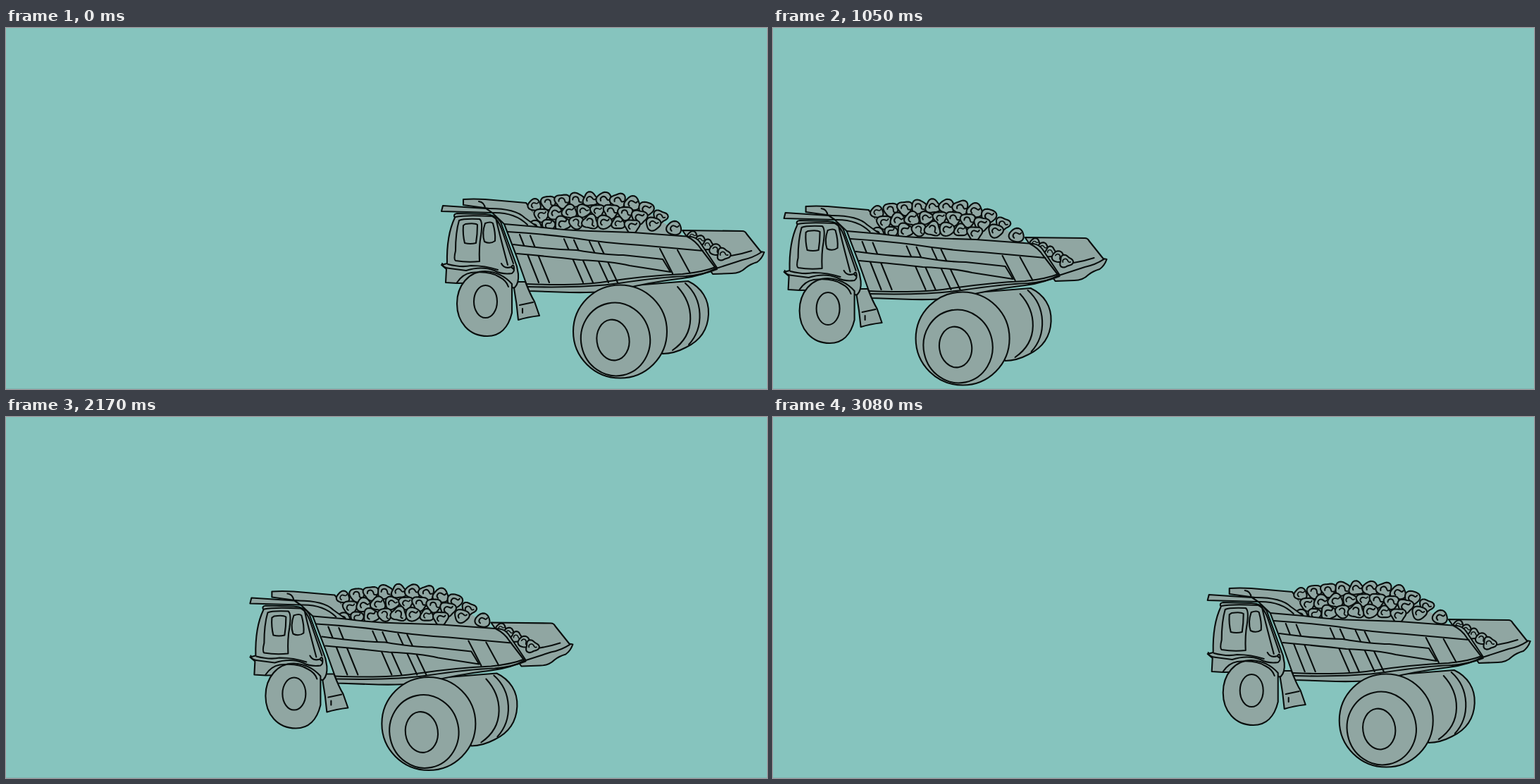
Write an HTML page that moves like this. It is 1080 px wide and 512 px high and loops after 3150 ms.

```html
<!DOCTYPE html>
<html lang="en">
<head>
<meta charset="utf-8">
<title>Dump truck</title>
<style>
html, body { margin: 0; width: 100%; height: 100%; overflow: hidden; background: #86c4be; }
svg { display: block; width: 1080px; height: 512px; }
#truck { fill: #90a6a2; stroke: #090e0d; stroke-width: 2.1; stroke-linecap: round; stroke-linejoin: round; }
.line { fill: none; }
</style>
</head>
<body>
<svg viewBox="0 0 1080 512">
<path d="M0 511.5H1080" stroke="#7eb6b1"/>
<g id="truck">
  <!-- rear axle and far wheels -->
  <path d="M880 366L968 359C987 368 998 385 997 406C996 428 984 444 965 453Q948 462 932 462Z"/>
  <path class="line" d="M953 367C976 392 981 433 946 457M964 362C990 385 991 425 969 449"/>

  <!-- tailgate and canopy -->
  <path d="M960 287L1045 288Q1049 288 1051 292L1071 317L1076 318Q1073 327 1066 332Q1056 335 1050 340Q1042 348 1030 348L1003 349Z"/>
  <path class="line" d="M1072 318Q1060 326 1045 329L1008 341M1029 323Q1043 321 1058 316"/>
  <path d="M649 251V243Q663 242 680 243L738 248L768 285L700 258Z"/>
  <path class="line" d="M671 246Q679 247 680 256"/>

  <path stroke="none" d="M745 254Q835 230 900 254L960 294H760Z"/>
  <g id="rocks"></g>

  <!-- dump body -->
  <path d="M681 256Q722 255 736 269L754 282Q790 287 830 288L890 290L972 296Q980 297 985 304L1009 340Q990 351 960 355Q905 362 878 370Q850 376 800 375L742 373L725 325L707 278L690 262Z"/>
  <path class="line" id="ribs"/>
  <path class="line" d="M707 278L754 282M712 289Q760 292 800 297Q850 305 900 308L989 316M967 296Q979 302 986 313L1006 339"/>
  <path d="M720 307Q770 314 810 315Q850 322 876 322L932 328L943 346L885 337Q860 331 815 329Q780 325 725 320"/>
  <path class="line" d="M928 313L946 348M953 315L971 348M738 363Q810 366 850 360Q910 351 960 349Q990 346 1007 339M740 367Q820 369 870 362Q930 353 965 352Q990 350 1009 342"/>

  <!-- visor and mud flap -->
  <path d="M620 252L681 256L690 262L618 260Z"/>
  <path class="line" d="M690 262Q722 261 740 279"/>
  <path d="M725 360L737 360Q744 378 750 388L757 408Q740 410 727 414Q725 391 721 369Z"/>
  <path class="line" d="M729 393L748 389M733 398V404"/>

  <!-- cab -->
  <path d="M637 269Q634 264 640 263L680 264Q696 265 702 275L725 338L727 349Q728 362 722 368Q715 370 713 361L640 362L624 361L625 342L618 336L626 334Q625 294 637 269Z"/>
  <path d="M640 391C640 365 657 345 680 345Q703 346 718 363L718 404C713 425 701 437 683 437C657 437 640 417 640 391Z"/>
  <ellipse cx="680.5" cy="388" rx="16.5" ry="23"/>
  <path class="line" d="M640 361Q648 349 660 347Q686 344 700 353Q710 358 713 367M619 334Q619 340 630 341L653 344Q675 337 693 344Q704 350 718 348Q724 343 718 340M627 335Q646 340 660 337Q680 337 698 343M703 334Q707 342 717 339Q721 333 721 342"/>
  <path class="line" d="M638 268Q651 265 690 267Q699 271 705 290L720 334M695 269Q700 291 712 336"/>
  <path class="line" d="M643 273Q649 270 672 271Q677 274 674 294Q671 310 672 331Q655 333 638 330Q635 328 638 316Q638 290 643 273ZM652 278Q665 276 669 279Q669 293 667 305Q659 307 651 305Q648 293 649 280ZM680 277Q688 274 691 277Q695 291 694 302Q687 307 679 303Q675 291 680 277Z"/>

  <!-- near rear wheel -->
  <ellipse cx="871.5" cy="430.5" rx="66.5" ry="66"/>
  <ellipse cx="865" cy="441.5" rx="49" ry="52" transform="rotate(-12 865 441.5)"/>
  <ellipse cx="861.5" cy="442.5" rx="23" ry="29" transform="rotate(-8 861.5 442.5)"/>
</g>
</svg>
<script>
const truck = document.getElementById('truck');

let seed = 7;
const random = () => (seed = seed * 16807 % 2147483647) / 2147483647;

// A lumpy closed outline with a short curl inside
function rock(x, y, r) {
  const phase = random() * 6.3, bump = .06 + random() * .12;
  let outline = '';
  for (let a = 0; a < 6.28; a += .25) {
    const d = r * (1 + bump * Math.sin(3 * a + phase));
    outline += `${outline ? 'L' : 'M'}${x + d * Math.cos(a)} ${y + d * .92 * Math.sin(a)}`;
  }
  const turn = random() * 120 - 60;
  return `<path d="${outline}Z"/><path class="line" d="M-5 2C-7-3-1-6 2-3S4 2 8 0"
    transform="translate(${x} ${y}) rotate(${turn}) scale(${r / 11})"/>`;
}

// Top edge of the heap: shallow on the left, falling away on the right
function heapTop(x) {
  const d = x - 835;
  return 243 + (d < 0 ? 8 * (d / 85) ** 2 : 41 * (d / 113) ** 2.6);
}

let rocks = '';
for (let row = 0; row < 3; row++) {
  for (let x = 750 + row % 2 * 10; x < 950; x += 19.8) {
    const y = heapTop(x) + row * 16;
    if (y < 288) rocks += rock(x, y, 9 + random() * 2);
  }
}
for (let i = 0; i < 5; i++) rocks += rock(974 + i * 11, 295 + i * 6.5, 7 + i * .5);
document.getElementById('rocks').innerHTML = rocks;

document.getElementById('ribs').setAttribute('d',
  [729, 744, 792, 806, 828, 841].map(x => `M${x} ${293 + (x - 729) * .1}L${x + 27} 361`).join(''));

// Cubic ease-in-out with control points .42 and .58
function ease(p) {
  let lo = 0, hi = 1;
  for (let i = 0; i < 24; i++) {
    const m = (lo + hi) / 2, n = 1 - m;
    if (1.26 * n * n * m + 1.74 * n * m * m + m ** 3 < p) lo = m; else hi = m;
  }
  return lo * lo * (3 - 2 * lo);
}

const start = performance.now();

// Motion made at 25 steps a second, shown every 70 ms
function draw(now) {
  const shown = Math.floor(Math.max(0, now - start) % 3150 / 70) * 70;
  const t = Math.floor(shown / 40) * 40;
  const away = t < 1050 ? ease(t / 1050) : 1 - ease((t - 1050) / 2100);
  truck.setAttribute('transform', `translate(${-602.5 * away} ${10 * away})`);
  requestAnimationFrame(draw);
}
draw(start);
</script>
</body>
</html>
```
